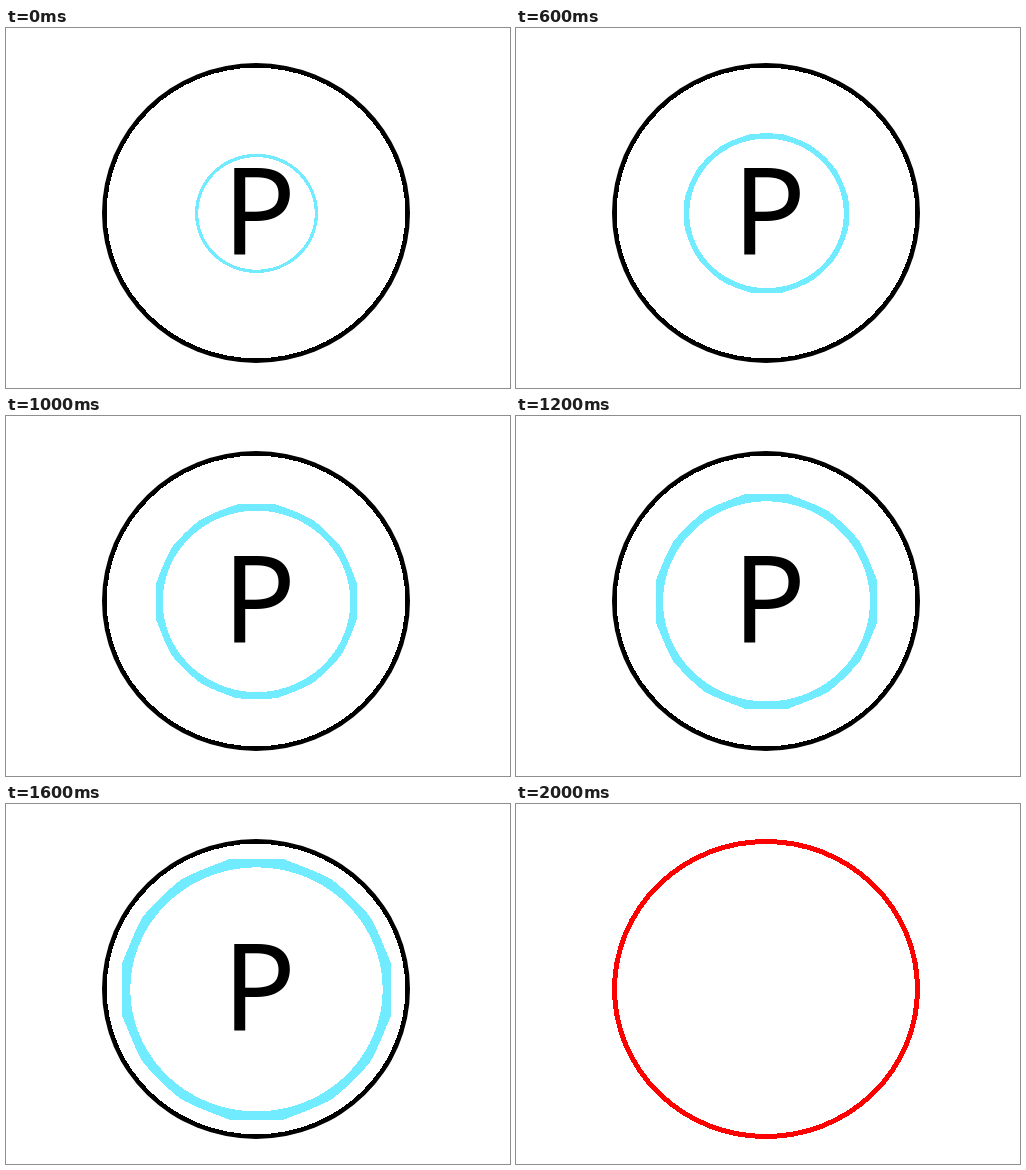
An HTML page that plays this animation: 504x360 px, repeating every 2.5 s.

```html
<!DOCTYPE html>
<html lang="en">
<head>
<meta charset="utf-8">
<title>Expanding ring</title>
<style>
  html, body { margin: 0; width: 100%; height: 100%; overflow: hidden; background: #fff; }
  svg { display: block; width: 504px; height: 360px; }
  #ring { fill: #70ebff; fill-rule: evenodd; shape-rendering: crispEdges; }
  #inside { fill: #fff; shape-rendering: crispEdges; }
  #alert { fill: none; stroke: #f00; stroke-width: 5; shape-rendering: crispEdges; }
  text { font: 121.5px "Noto Sans", "Open Sans", sans-serif; }
  #scene { animation: hide 2.5s step-end infinite; }
  #alert { animation: show 2.5s step-end infinite; }
  @keyframes hide { 0% { visibility: visible; } 80% { visibility: hidden; } }
  @keyframes show { 0% { visibility: hidden; } 80% { visibility: visible; } }
</style>
</head>
<body>
<svg viewBox="0 0 504 360">
  <g id="scene">
    <ellipse cx="250" cy="185" rx="154" ry="150"/>
    <ellipse id="inside" cx="250" cy="185" rx="149.3" ry="145.3"/>
    <path id="ring"/>
    <text x="216.5" y="227">P</text>
  </g>
  <ellipse id="alert" cx="250" cy="185" rx="151.5" ry="147.5"/>
</svg>
<script>
const ring = document.getElementById('ring');
const LOOP = 2500, STEP = 100, LAST = 19;
const SECTOR = Math.PI / 8;

// Closed outline; flat = 0 is an ellipse, flat = 1 flattens its sides, least on the diagonals.
function outline(cx, cy, rx, ry, flat) {
  const points = [];
  for (let i = 0; i < 192; i++) {
    const a = i * Math.PI / 96;
    const off = a - Math.round(a / SECTOR) * SECTOR;
    const bulge = flat * (0.7 + 0.3 * Math.cos(4 * a));
    const r = 1 + bulge * (1 / Math.cos(off) - 1);
    points.push((cx + rx * r * Math.cos(a)).toFixed(2) + ' ' + (cy + ry * r * Math.sin(a)).toFixed(2));
  }
  return 'M' + points.join('L') + 'Z';
}

function drawRing(n) {
  const scale = Math.pow(1.0503, n);
  const rx = 61.5 * scale, ry = 59.6 * scale;
  const width = 3.3 + 0.34 * n;
  const flat = n < 18 ? Math.min(1, n / 12) : 0;
  const cx = n < 18 ? 250.5 : 250, cy = n < 18 ? 185.4 : 185;
  ring.setAttribute('d',
    outline(cx, cy, Math.min(rx, 149), Math.min(ry, 145), flat) +
    outline(cx, cy, Math.min(rx - width, 144), Math.min(ry - width, 140), 0));
}

let shown = -1;
function frame() {
  const n = Math.min(LAST, Math.floor(performance.now() % LOOP / STEP));
  if (n !== shown) drawRing(shown = n);
  requestAnimationFrame(frame);
}
frame();

// Keep the CSS clock on the same zero as performance.now().
document.getAnimations().forEach(a => { a.startTime = 0; });
</script>
</body>
</html>
```
